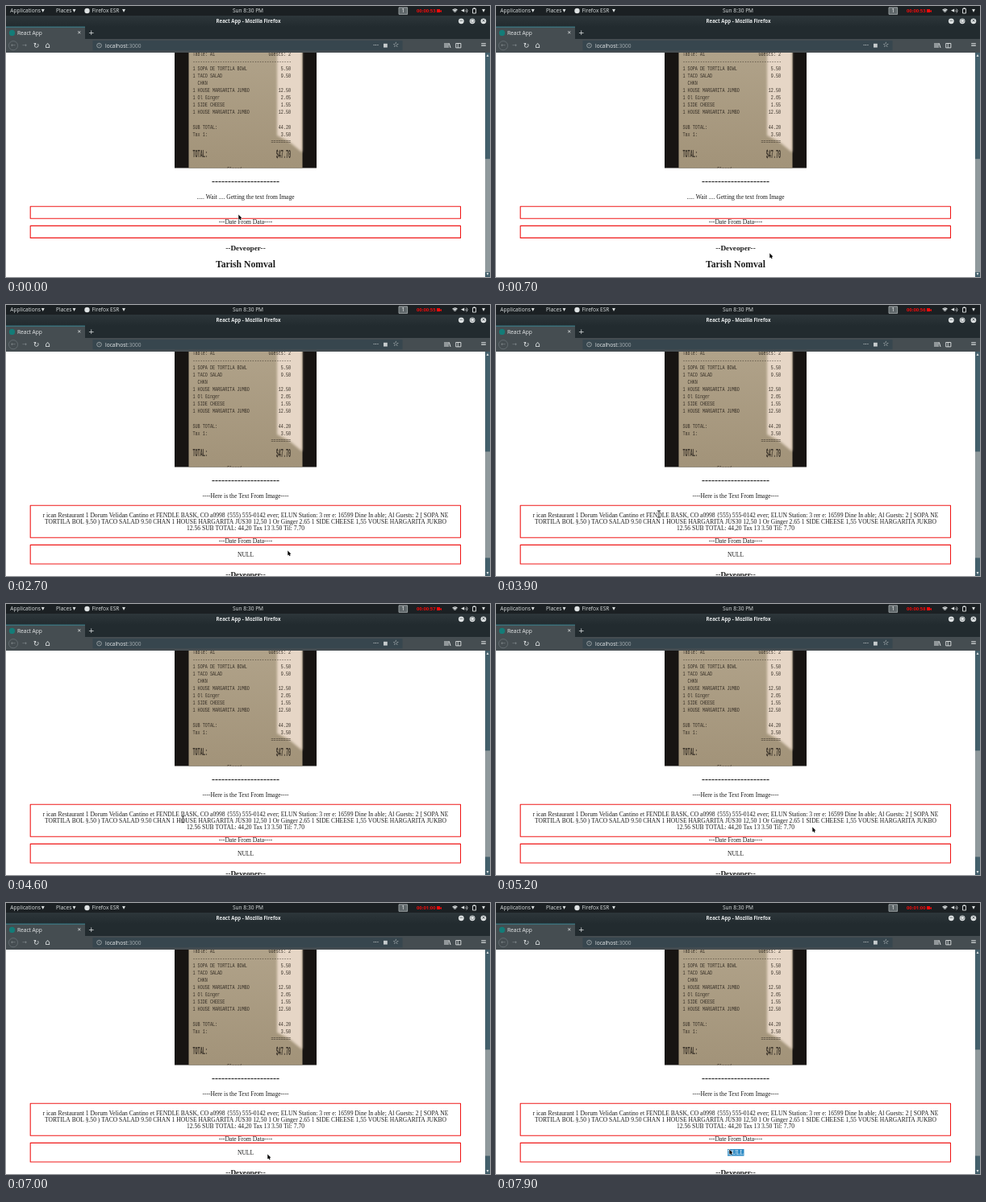
Write an HTML page with a canvas that moves like this. It is 600 px wide and 337 px high and loops after 8 s.

```html
<!DOCTYPE html>
<html lang="en">
<head>
<meta charset="utf-8">
<title>Receipt reader</title>
<style>
html, body { margin: 0; width: 100%; height: 100%; overflow: hidden; background: #fff; }
canvas { display: block; width: 600px; height: 337px; }
</style>
</head>
<body>
<canvas id="stage"></canvas>
<script>
const W = 600, H = 337, LOOP = 8000, STEP = 100;
const READ_AT = 2700, SELECT_AT = 7800;
const SERIF = '"Liberation Serif", serif';
const SANS = '"Open Sans", sans-serif';
const MONO = '"Liberation Mono", monospace';
const SYMBOL = '"DejaVu Sans", sans-serif';
const LIGHT = '#dfe3e4', DARK = '#222b2f', TOOLBAR = '#454d51', RED = '#f00b0b';
const UI = '6.6px ' + SANS;
const canvas = document.getElementById('stage');
const ctx = canvas.getContext('2d');
const dpr = window.devicePixelRatio || 1;
canvas.width = W * dpr;
canvas.height = H * dpr;

const OCR_LINES = [
  'r ican Restaurant 1 Dorum Velidan Cantino et FENDLE BASK, CO a0998 {555) 555-0142 ever; ELUN Station: 3 rer e: 16599 Dine In able; Al Guests: 2 [ SOPA NE',
  'TORTILA BOL §.50 ) TACO SALAD 9.50 CHAN 1 HOUSE HARGARITA JUS30 12,50 1 Or Ginger 2.65 1 SIDE CHEESE 1,55 VOUSE HARGARITA JUKBO',
  '12.56 SUB TOTAL: 44,20 Tax 13 3.50 Til: 7.70'
];

const RECEIPT = `Table: A1|Guests: 2
----------------------------------------|
1 SOPA DE TORTILA BOWL|5.50
1 TACO SALAD|9.50
  CHKN|
1 HOUSE MARGARITA JUMBO|12.50
1 Ol Ginger|2.65
1 SIDE CHEESE|1.55
1 HOUSE MARGARITA JUMBO|12.50
|
SUB TOTAL:|44.20
Tax 1:|3.50
|========`.split('\n').map(row => row.split('|'));

// pointer moves: start, end, x, y
const MOVES = [
  [100, 450, 276, 302], [450, 700, 339, 307], [800, 1100, 349, 305],
  [3200, 3900, 202, 260], [3900, 4100, 133, 263], [4300, 5200, 392, 277],
  [5200, 5600, 541, 270], [5600, 6200, 205, 265], [6200, 6500, 110, 272],
  [6500, 7000, 324, 312], [7000, 7500, 309, 311], [7600, 7900, 289, 306]
];

function pointerAt(t) {
  return MOVES.reduce(([x, y], [from, to, toX, toY]) => {
    const k = Math.min(1, Math.max(0, (t - from) / (to - from)));
    return [x + (toX - x) * k, y + (toY - y) * k];
  }, [288, 259]);
}

function rect(x, y, w, h, color) {
  ctx.fillStyle = color;
  ctx.fillRect(x, y, w, h);
}

function text(s, x, y, font, color = '#1c1c1c', align = 'left') {
  ctx.font = font;
  ctx.fillStyle = color;
  ctx.textAlign = align;
  ctx.fillText(s, x, y);
}

function icon(s, x, y, size, color = LIGHT) {
  ctx.textBaseline = 'middle';
  text(s, x, y, `${size}px ${SYMBOL}`, color, 'center');
  ctx.textBaseline = 'alphabetic';
}

function shape(points, color) {
  ctx.fillStyle = color;
  ctx.beginPath();
  points.forEach(([x, y]) => ctx.lineTo(x, y));
  ctx.fill();
}

function line(x1, y1, x2, y2, color = LIGHT, width = 1) {
  ctx.strokeStyle = color;
  ctx.lineWidth = width;
  ctx.beginPath();
  ctx.moveTo(x1, y1);
  ctx.lineTo(x2, y2);
  ctx.stroke();
}

function frame(x, y, w, h, color = LIGHT, width = 0.9) {
  ctx.strokeStyle = color;
  ctx.lineWidth = width;
  ctx.strokeRect(x, y, w, h);
}

function disc(x, y, r, color) {
  ctx.fillStyle = color;
  ctx.beginPath();
  ctx.arc(x, y, r, 0, 7);
  ctx.fill();
}

function arc(x, y, r, from = 0, to = 7, color = LIGHT, width = 0.8) {
  ctx.strokeStyle = color;
  ctx.lineWidth = width;
  ctx.beginPath();
  ctx.arc(x, y, r, from, to);
  ctx.stroke();
}

function shade(y0, y1, top, bottom) {
  const g = ctx.createLinearGradient(0, y0, 0, y1);
  g.addColorStop(0, top);
  g.addColorStop(1, bottom);
  return g;
}

function drawPanel(t) {
  rect(0, 0, W, 12, '#1b2023');
  text('Applications', 5.3, 8.4, UI, LIGHT);
  text('Places', 62, 8.4, UI, LIGHT);
  disc(100.5, 6, 3.2, LIGHT);
  text('Firefox ESR', 106.5, 8.4, UI, LIGHT);
  [45.8, 84.5, 146, 592].forEach(x => icon('▾', x, 6, 8));
  text('Sun 8:30 PM', 300, 8.4, UI, LIGHT, 'center');

  rect(487, 1.5, 11, 9, '#5f676a');
  frame(487, 1.9, 10.6, 8.4, '#a0a6a8');
  text('1', 492.3, 8.4, UI, '#fff', 'center');

  const sec = 53 + Math.floor(t / 1000);
  const pad = n => String(n).padStart(2, '0');
  text(`00:${pad(Math.floor(sec / 60))}:${pad(sec % 60)}`, 509, 8.3, 'bold 5.9px ' + SANS, RED);
  rect(534, 4, 4, 4, RED);
  icon('◂', 538.5, 6, 6, RED);

  [1.5, 3, 4.5].forEach(r => arc(556.5, 8.5, r, -2.3, -0.85, LIGHT, 1.2));
  icon('◀', 566, 6, 5.5);
  [1.5, 3.2].forEach(r => arc(568.8, 6, r, -0.9, 0.9));
  frame(578.5, 3.4, 4, 5.6);
  rect(579.5, 2.2, 2, 1.2, LIGHT);
}

function drawBrowser() {
  rect(0, 12, W, 14, shade(12, 26, '#2d363a', DARK));
  rect(0, 26, W, 15, DARK);
  text('React App - Mozilla Firefox', 300.5, 20.9, 'bold 6.1px ' + SANS, '#e8ebec', 'center');
  ['−', '○', '×'].forEach((s, i) => {
    disc(564.3 + i * 13.8, 18.8, 3.4, LIGHT);
    icon(s, 564.3 + i * 13.8, 18.8, 6, DARK);
  });

  rect(0, 26, 98, 15, TOOLBAR);
  rect(0, 25.6, 98, 1, '#3d8794');
  disc(7.5, 33.4, 3.6, '#147c78');
  text('React App', 14, 35.8, UI, '#e8ebec');
  icon('✕', 90.8, 33.3, 6);
  icon('+', 105.7, 33.3, 9);

  rect(0, 41, W, 17, TOOLBAR);
  const dim = '#858d90';
  arc(9, 49.2, 5.6, 0, 7, '#697276');
  icon('←', 9, 49.2, 7, dim);
  icon('→', 23, 49.2, 7, dim);
  icon('↻', 37.5, 49.2, 9);
  icon('⌂', 51.5, 49, 10);

  rect(107.5, 43, 384, 12.4, '#37464e');
  arc(115.5, 49.1, 2.8, 0, 7, '#b9bfc1', 0.7);
  icon('i', 115.5, 49.1, 4.5, '#b9bfc1');
  text('localhost', 123, 51.6, UI, '#e8ebec');
  text(':3000', 123 + ctx.measureText('localhost').width, 51.6, UI, '#a4adb1');
  icon('•••', 458.5, 49.2, 4);
  rect(468, 46.8, 4.8, 4.8, '#c6cbcd');
  icon('☆', 483.3, 49, 9);

  for (let x = 544; x < 549; x += 2) line(x, 46, x, 52);
  line(549.3, 46.3, 551, 52);
  frame(557.7, 46.5, 6.2, 5.4);
  line(560.3, 46.5, 560.3, 52, LIGHT, 0.8);
  icon('≡', 592, 49, 9);
}

function printed(s, x, y, tall, align = 'left', weight = '') {
  ctx.save();
  ctx.translate(x, y);
  ctx.scale(1, tall);
  text(s, 0, 0, `${weight} 5.1px ${MONO}`, '#373027', align);
  ctx.restore();
}

function drawPhoto() {
  ctx.save();
  ctx.beginPath();
  ctx.rect(209, 58, 176, 143.5);
  ctx.clip();
  rect(209, 58, 176, 144, '#171412');
  rect(226.5, 58, 141, 144, shade(58, 202, '#b0a289', '#a29379'));
  ctx.filter = 'blur(1.5px)';
  shape([[336, 50], [367, 50], [367, 182], [350, 168], [336, 161]], '#e6d6c6');
  ctx.filter = 'none';

  RECEIPT.forEach(([item, price], i) => {
    const y = 62 + i * 9.05;
    printed(item, 231.5, y, 1.4);
    printed(price, 353, y, 1.4, 'right');
  });
  printed('TOTAL:', 231.5, 188, 2.4, 'left', 'bold');
  printed('$47.70', 353, 189, 2.9, 'right', 'bold');
  printed('Closed', 274, 204.5, 1.3);
  ctx.restore();
}

function drawScrollbar(docHeight) {
  const top = 64, track = 267, view = H - 58;
  rect(594, 58, 6, view, '#435f6b');
  rect(594, top + track * 250 / docHeight, 6, track * view / docHeight, '#8f999c');
  icon('▴', 597, 61.5, 6);
  icon('▾', 597, 333.5, 6);
}

function drawPage(done, selected) {
  const body = '7.57px ' + SERIF;
  const mid = (s, y, font = body, color) => text(s, 297, y, font, color, 'center');
  const box = (y, h) => frame(30.2, y, 533.3, h, '#f01818', 1.1);
  const shift = done ? 25 : 0;
  const grow = done ? 8.6 : 0;

  rect(0, 58, W, H - 58, '#fff');
  drawPhoto();
  mid('-'.repeat(21), 221.6, 'bold 12px ' + SERIF);
  mid(done ? '----Here is the Text From Image----' : '..... Wait .... Getting the text from Image', 240.3);
  box(249.3, 15 + shift);
  box(273.4 + shift, 15 + grow);
  mid('---Date From Data----', 271.2 + shift);
  if (done) {
    OCR_LINES.forEach((s, i) => mid(s, 263.5 + i * 8.3));
    if (selected) rect(287, 306, 20.5, 8.5, '#308cc6');
    mid('NULL', 312.8, body, selected ? '#fff' : undefined);
  }
  mid('--Deveoper--', 304 + shift + grow, 'bold 9.25px ' + SERIF);
  mid('Tarish Nomval', 324.8 + shift + grow, 'bold 11.7px ' + SERIF);
  drawScrollbar(done ? 564 : 529);
}

function overText(x, y) {
  const within = (half, top, bottom) => Math.abs(x - 297.5) < half && y > top && y < bottom;
  return within(251, 257, 273) || within(73, 273, 282) || within(12, 305, 315);
}

function drawBeam(x, y) {
  [['#fff', 2], ['#111', 0.9]].forEach(([color, width]) => {
    line(x, y - 4, x, y + 4, color, width);
    [y - 4, y + 4].forEach(end => line(x - 2, end, x + 2, end, color, width));
  });
}

function drawArrow(x, y) {
  const head = [[x, y], [x, y + 6.6], [x + 4.6, y + 4.6]];
  ctx.lineJoin = 'round';
  line(x + 1.6, y + 4, x + 3, y + 7.2, '#fff', 2.2);
  shape(head, '#0a0a0a');
  ctx.strokeStyle = '#fff';
  ctx.lineWidth = 0.5;
  ctx.closePath();
  ctx.stroke();
  line(x + 1.6, y + 4, x + 3, y + 7, '#0a0a0a', 1.3);
}

function draw(t) {
  ctx.setTransform(dpr, 0, 0, dpr, 0, 0);
  const done = t >= READ_AT;
  const selected = t >= SELECT_AT;
  const [x, y] = pointerAt(t);
  drawPage(done, selected);
  drawBrowser();
  drawPanel(t);
  const pointer = done && !selected && overText(x, y) ? drawBeam : drawArrow;
  pointer(x, y);
}

const start = performance.now();
function tick() {
  const t = (performance.now() - start) % LOOP;
  draw(Math.floor(t / STEP) * STEP);
  requestAnimationFrame(tick);
}
tick();
</script>
</body>
</html>
```
